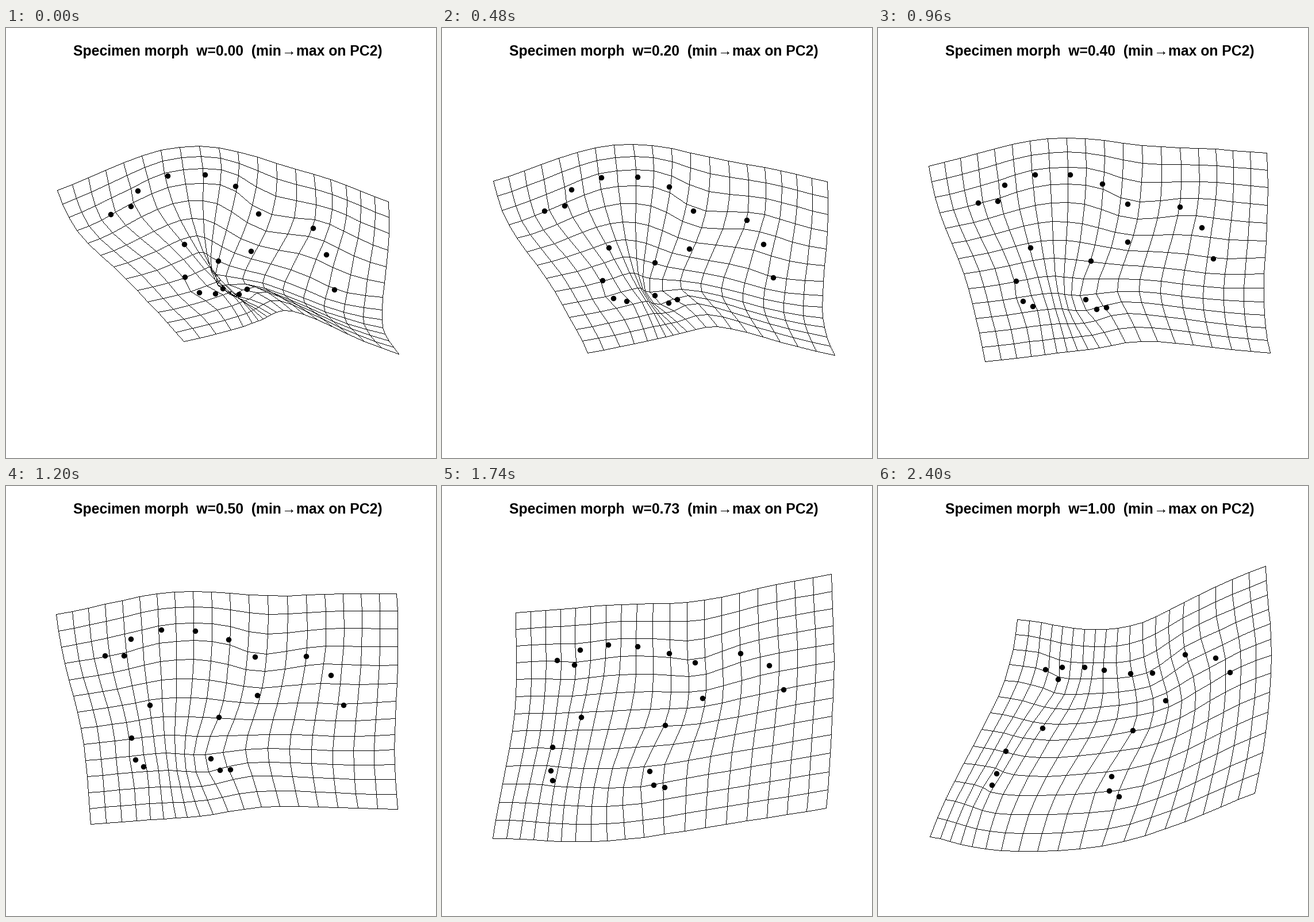
Write a matplotlib script that moves like this. It is 748x748 px and loops after 2.46 s.

```python
import itertools

import numpy as np
import matplotlib.pyplot as plt
from matplotlib.animation import FuncAnimation

SIZE, DPI = 748, 100
FRAMES, INTERVAL = 41, 60
COLS, ROWS = 20, 14
GRID_WIDTH = 594
END_SCALE = 0.823  # size of the end shape relative to the start shape

# Landmarks: reference cell (u, v), start position (x, y), end position (x, y)
LANDMARKS = np.array([
    (2.71, 2.93, 182, 323, 290, 318),
    (3.85, 3.14, 217, 309, 312, 335),
    (4.30, 2.35, 229, 282, 319, 314),
    (6.15, 2.27, 281, 257, 358, 314),
    (8.08, 2.45, 346, 255, 392, 319),
    (9.92, 2.75, 399, 274, 438, 325),
    (11.40, 3.15, 439, 322, 476, 324),
    (14.00, 3.50, 533, 347, 533, 292),
    (15.45, 4.57, 556, 393, 586, 298),
    (16.29, 6.03, 570, 454, 611, 323),
    (11.80, 5.45, 426, 387, 499, 372),
    (10.00, 6.95, 369, 404, 442, 424),
    (5.05, 6.28, 310, 375, 285, 420),
    (3.12, 7.94, 311, 432, 221, 460),
    (3.40, 9.24, 336, 459, 205, 499),
    (3.76, 9.69, 364, 461, 197, 519),
    (10.40, 9.25, 377, 452, 405, 504),
    (10.64, 9.98, 405, 462, 401, 529),
    (11.04, 10.29, 419, 453, 418, 539),
])

# Corners and edge middles of the grid, row by row: start and end positions
RIM_CELLS = [c[::-1] for c in itertools.product((0, 6, 13), (0, 9, 19))
             if c != (6, 9)]
RIM = np.array([
    (90, 282, 242, 232), (370, 208, 416, 247), (665, 302, 673, 139),
    (187, 415, 195, 394), (655, 468, 683, 294),
    (309, 545, 90, 609), (461, 498, 312, 633), (683, 566, 654, 533),
])


def kernel(p, q):
    r2 = ((p[:, None] - q[None]) ** 2).sum(axis=2)
    return r2 * np.log(np.where(r2 > 0, r2, 1))


def affine(p):
    return np.column_stack([np.ones(len(p)), p])


def warp(points, ref, target):
    """Thin-plate spline taking ref to target, evaluated at points."""
    q = affine(ref)
    system = np.block([[kernel(ref, ref), q], [q.T, np.zeros((3, 3))]])
    pad = np.zeros((3, target.shape[1]))
    coef = np.linalg.solve(system, np.vstack([target, pad]))
    return np.hstack([kernel(points, ref), affine(points)]) @ coef


def raster(net):
    """Canvas with the net drawn in hard one-pixel lines."""
    canvas = np.ones((SIZE, SIZE))
    net = np.rint(net).astype(int)
    for line in itertools.chain(net, net.transpose(1, 0, 2)):
        for a, b in zip(line[:-1], line[1:]):
            steps = max(abs(b - a).max(), 1)
            t = np.arange(steps + 1)[:, None] / steps
            x, y = np.rint(a + (b - a) * t).astype(int).T
            canvas[y, x] = 0
    return canvas


nodes = np.array([(u, v) for v in range(ROWS) for u in range(COLS)], float)
reference = np.vstack([LANDMARKS[:, :2], RIM_CELLS])
grids = warp(nodes, reference, np.vstack([LANDMARKS[:, 2:], RIM]))

fig = plt.figure(figsize=(SIZE / DPI, SIZE / DPI), dpi=DPI, facecolor="white")
ax = fig.add_axes([0, 0, 1, 1])
edge = SIZE - 0.5
mesh = ax.imshow(np.ones((SIZE, SIZE)), cmap="gray", vmin=0, vmax=1,
                 interpolation="nearest", aspect="auto",
                 extent=(-0.5, edge, edge, -0.5))
dots, = ax.plot([], [], "o", color="black", ms=6.8, mew=0, antialiased=False)
ax.set_xlim(-0.5, edge)
ax.set_ylim(edge, -0.5)
ax.axis("off")


def label(x, text, align, family="Liberation Sans", weight="bold"):
    return ax.text(x, 47.5, text, ha=align, va="baseline", fontsize=17.85,
                   family=family, weight=weight)


title = label(116.5, "", "left")
label(492, "\u2192", "center", "Liberation Serif", "normal")
label(654.5, "max on PC2)", "right")


def draw(i):
    w = i * 0.025

    def blend(pair):
        return (1 - w) * pair[:, :2] + w * END_SCALE * pair[:, 2:]

    # Fit the grid to a constant width; its centre drifts a little
    grid = blend(grids)
    low, high = grid.min(axis=0), grid.max(axis=0)
    scale = GRID_WIDTH / (high[0] - low[0])
    knots = [0, 0.63, 1]
    centre = np.array([np.interp(w, knots, [386.4, 383.7, 387.1]),
                       np.interp(w, knots, [385.8, 385.3, 387])])
    shift = centre - scale * (low + high) / 2

    mesh.set_data(raster((scale * grid + shift).reshape(ROWS, COLS, 2)))
    dots.set_data(*(scale * blend(LANDMARKS[:, 2:]) + shift).T)
    title.set_text(f"Specimen morph  w={w:.2f}  (min")
    return mesh, dots, title


anim = FuncAnimation(fig, draw, frames=FRAMES, interval=INTERVAL,
                     repeat=True, repeat_delay=0)
plt.show()
```
